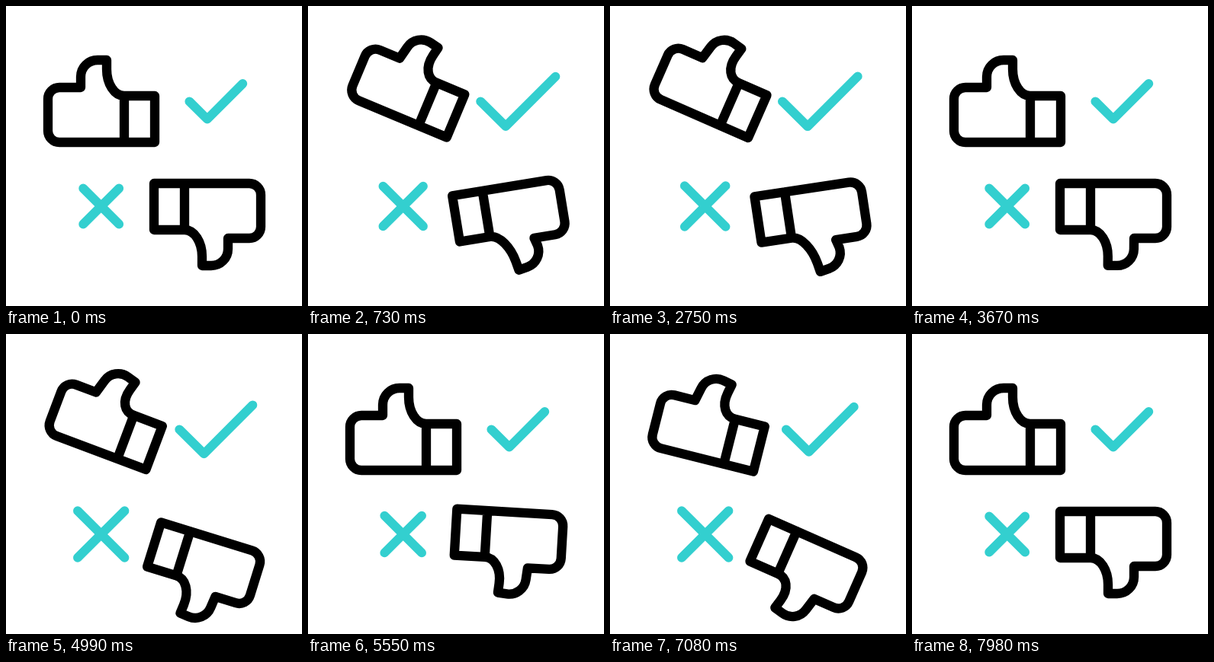
An HTML page for the animation above (8 s loop, 388 by 394 pixels).

```html
<!DOCTYPE html>
<html lang="en">
<head>
<meta charset="utf-8">
<title>Thumbs</title>
<style>
  html, body { margin: 0; height: 100%; overflow: hidden; background: #fff; }
  svg { display: block; width: 388px; height: 394px; }
  path { fill: none; stroke: #000; stroke-width: 12.3; stroke-linecap: round; stroke-linejoin: round; }
  .mark { stroke: #33cfcf; stroke-width: 11.8; }
</style>
</head>
<body>
<svg viewBox="0 0 388 394">
  <path id="up"/>
  <g transform="rotate(180 194.5 206)"><path id="down"/></g>
  <path id="check" class="mark"/>
  <path id="cross" class="mark"/>
</svg>
<script>
const PERIOD = 2000;
const $ = id => document.getElementById(id);

// Eased step from 0 to 1 between two times.
function ramp(t, from, to) {
  const u = Math.min(1, Math.max(0, (t - from) / (to - from)));
  return (1 - Math.cos(Math.PI * u)) / 2;
}

// One gesture: dip to low, swing over to high, settle back to 0.
function swing(t, low, high) {
  return low * ramp(t, 50, 380) + (high - low) * ramp(t, 380, 790) - high * ramp(t, 870, 1340);
}

// Hand outline; the thumb points turn about the thumb's base.
function handPath(bend) {
  const c = Math.cos(bend * Math.PI / 180), s = Math.sin(bend * Math.PI / 180);
  const p = (x, y) => {
    const dx = x - 116, dy = y - 110;
    return `${116 + dx * c - dy * s} ${110 + dx * s + dy * c} `;
  };
  return `M155 179V118H195V179H70A15 15 0 0 1 55 164V122A15 15 0 0 1 70 107H98` +
    `L${p(98, 93)}C${p(98, 80.5)}${p(108, 71)}${p(120, 71)}L${p(132, 71)}L${p(132, 83)}` +
    `C${p(132, 102)}142 118 155 118`;
}

// The lift runs ahead of the turn by `lead`; the thumb trails behind it.
function drawHand(node, t, height, lead) {
  const angle = swing(t, -9.6, 24.4);
  const shift = 0.27 * Math.max(0, angle);
  const lift = swing(t + lead, 0, height);
  node.setAttribute("d", handPath(swing(t - 55, -11, 16)));
  node.setAttribute("transform", `translate(${shift} ${-lift}) rotate(${angle} 125 143)`);
}

// Marks grow while their line weight stays the same.
function drawMark(node, cx, cy, scale, lines) {
  node.setAttribute("d", lines.map(points =>
    "M" + points.map(([x, y]) => `${cx + x * scale} ${cy + y * scale}`).join("L")).join(""));
}

function draw(now) {
  const t = now % PERIOD;
  drawHand($("up"), t, 31, 35);
  drawHand($("down"), t - 325, 35, 70);

  const checkScale = 1 + 0.42 * (ramp(t, 230, 800) - ramp(t, 890, 1360));
  drawMark($("check"), 275.3, 125.3, checkScale, [[[-35, 0], [-11.5, 23.3], [35, -23.3]]]);

  const crossScale = 1 + 0.31 * (ramp(t, 570, 950) - ramp(t, 1250, 1640));
  const r = 23.5;
  drawMark($("cross"), 124.7, 263, crossScale, [[[-r, -r], [r, r]], [[r, -r], [-r, r]]]);
}

const start = performance.now();
function tick() {
  draw(performance.now() - start);
  requestAnimationFrame(tick);
}
tick();
</script>
</body>
</html>
```
